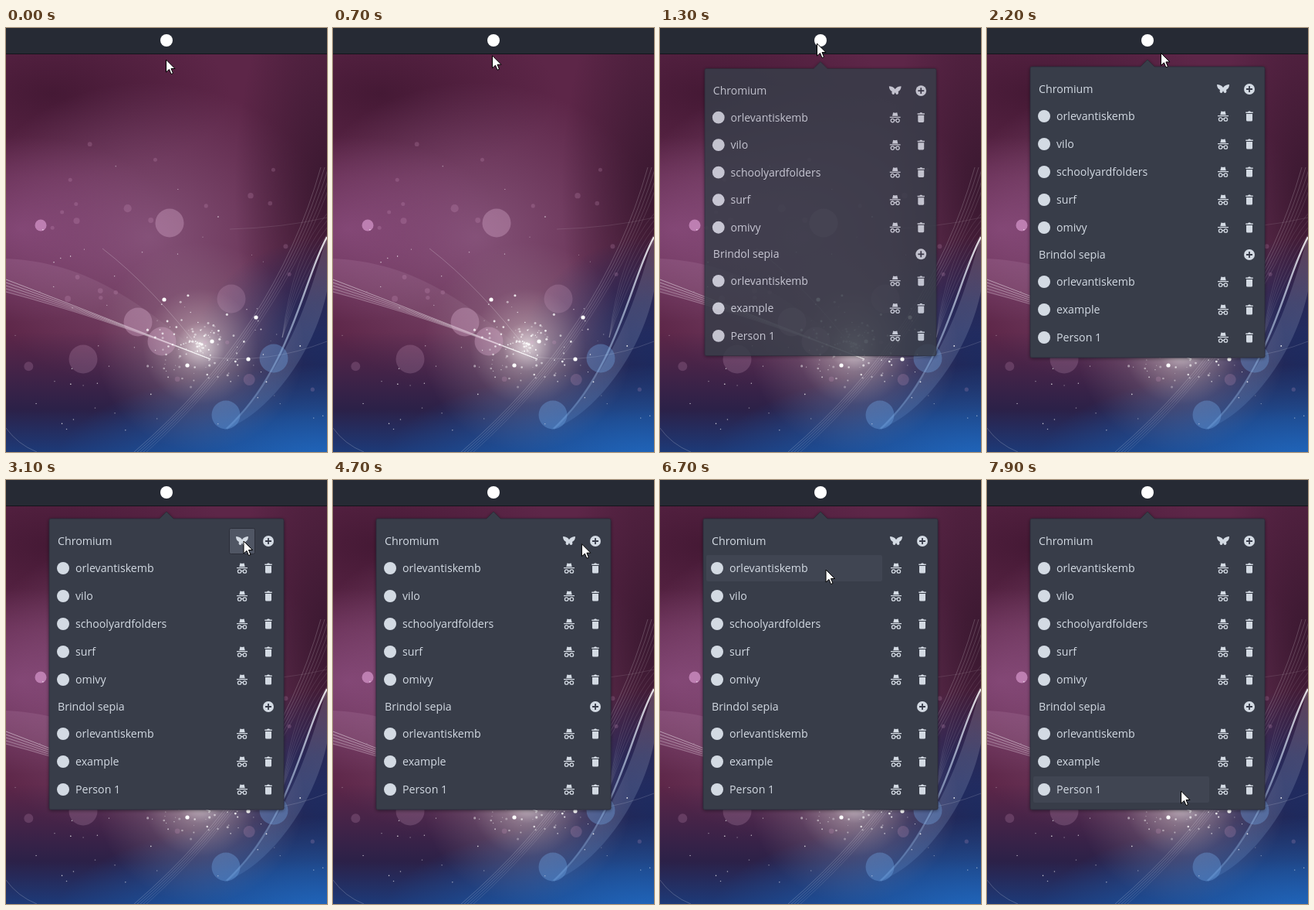
An HTML page that plays this animation: 416x548 px, repeating every 8000 ms.

```html
<!DOCTYPE html>
<html lang="en">
<head>
<meta charset="utf-8">
<title>Profile menu</title>
<style>
html, body { margin: 0; width: 100%; height: 100%; overflow: hidden; }
body {
  background:
    radial-gradient(circle at 252px 412px, rgba(255,250,248,.8), rgba(215,205,208,.46) 32px, rgba(170,150,165,.22) 75px, transparent 135px),
    radial-gradient(ellipse 350px 125px at 416px 560px, #2068bf, rgba(30,88,165,.8) 45%, transparent),
    linear-gradient(to top, #1d3a78, rgba(35,32,72,.85) 55px, transparent 155px),
    radial-gradient(ellipse 180px 170px at 416px 440px, rgba(22,48,108,.95), rgba(24,44,98,.7) 50%, transparent),
    radial-gradient(ellipse 120px 300px at 416px 210px, #3a1830, transparent),
    radial-gradient(ellipse 200px 120px at 20px 260px, rgba(140,78,128,.75), transparent),
    radial-gradient(ellipse 240px 200px at 185px 270px, rgba(134,84,122,.95), transparent),
    radial-gradient(ellipse 230px 110px at 60px 85px, #451935, transparent),
    #5d2648;
}
svg { display: block; width: 416px; height: 548px; font: 14.2px "Open Sans", "Noto Sans", sans-serif; }
text { fill: #d3dae3; white-space: pre; }
.icon { fill: #d3dae3; }
.thin { fill: none; stroke: #d3dae3; stroke-width: 1.3; }
.light { fill: none; stroke: #fff; }
</style>
</head>
<body>
<svg viewBox="0 0 416 548">
  <defs>
    <linearGradient id="veil" x2="1" y2=".4">
      <stop stop-color="#d9a9cf" stop-opacity=".14"/><stop offset="1" stop-color="#fff" stop-opacity=".04"/>
    </linearGradient>
    <linearGradient id="wing" x1="1" x2="0" y2="1">
      <stop stop-color="#fff" stop-opacity=".16"/><stop offset="1" stop-color="#6aa5e8" stop-opacity=".16"/>
    </linearGradient>
    <linearGradient id="edge" x2="0" y2="1">
      <stop stop-color="#fff" stop-opacity=".85"/><stop offset="1" stop-color="#8fbcf0" stop-opacity=".2"/>
    </linearGradient>
    <filter id="shade" x="-10%" y="-10%" width="120%" height="120%">
      <feDropShadow dx="0" dy="1" stdDeviation="2" flood-opacity=".45"/>
    </filter>
  </defs>
  <g id="wallpaper"></g>
  <rect width="416" height="33" fill="#262a34"/>
  <rect y="33" width="416" height="1" fill="#14151b"/>
  <circle cx="208" cy="16" r="8" fill="#fff"/>
  <g id="menu"></g>
  <g id="tips"></g>
  <path id="cursor" d="M0 0V16L4 12.5L6.5 18.5L9 17.5L6.5 11.5H11.5Z" fill="#fff" stroke="#000"/>
</svg>
<script>
const $ = id => document.getElementById(id);
const set = (id, attrs) => { for (const k in attrs) $(id).setAttribute(k, attrs[k]); };

let seed = 11;
const rnd = () => (seed = seed * 16807 % 2147483647) / 2147483647;
const dot = (x, y, r, fill, a) => `<circle cx="${x}" cy="${y}" r="${r}" fill="${fill}" fill-opacity="${a}"/>`;
const line = (d, a, w = 1) => `<path class="light" d="${d}" stroke-opacity="${a}" stroke-width="${w}"/>`;

function wallpaper() {
  let out = '<path d="M0 298C80 302 150 330 255 424C150 385 70 360 0 342Z" fill="url(#veil)"/>'
    + '<path d="M416 268C398 330 370 440 283 519C340 500 400 420 416 340Z" fill="url(#wing)"/>'
    + '<path d="M416 270C385 325 370 440 286 518" fill="none" stroke="url(#edge)" stroke-width="2.4"/>';
  for (let i = 0; i < 5; i++) {
    out += line(`M0 ${325 + i * 4}Q120 ${371 + i / 2} 265 428`, .45 - i * .05);
    out += line(`M${408 + i * 5} 180Q${348 + i * 2} 392 ${166 + i * 4} 548`, .2 - i * .02);
    out += line(`M416 ${240 + i * 9}Q${372 + i * 3} ${290 + i * 8} 358 400`, .1);
  }
  out += line('M125 285Q190 335 255 420', .22) + line('M416 245Q360 258 290 260', .1)
    + line('M416 405Q340 435 262 425', .15) + line('M0 517Q15 538 40 548', .2);

  for (const [x, y] of [[212, 252], [171, 380], [202, 405], [292, 350], [100, 428]])
    out += dot(x, y, 18.5, '#dcb0d0', y > 425 || x > 280 ? .2 : .34);
  for (const [x, y] of [[347, 427], [285, 500]]) out += dot(x, y, 18.5, '#78b0f0', .33);
  out += dot(45, 255, 7.5, '#e6a5dc', .6);
  for (const [x, y] of [[205, 351], [324, 374], [314, 428], [235, 436], [267, 405]])
    out += dot(x, y, 2.6, '#fff', 1);

  for (let i = 0; i < 120; i++) {
    const a = rnd() * 6.283, d = (rnd() + rnd()) * rnd() * 60;
    out += dot(252 + d * Math.cos(a) * 1.2, 409 + d * Math.sin(a), .5 + rnd() * 1.1, '#fff', .3 + rnd() * .6);
  }
  for (let i = 0; i < 55; i++)
    out += dot(rnd() * 416, 130 + 400 * Math.sqrt(rnd()), .5 + rnd() * .4, '#fff', .3 + rnd() * .6);
  for (let i = 0; i < 26; i++)
    out += dot(rnd() * 400, 150 + rnd() * 340, 2.5 + 5 * rnd() ** 3, '#dda6cc', .2);
  return out;
}

const at = (x, y, body) => `<g transform="translate(${x} ${y})">${body}</g>`;
const butterfly = '<path class="icon" d="M0-2C-2-5-5-6-8-6C-8-2-6 0-4 1C-5 3-4 5-2.5 5C-1 5-.5 3 0 2C.5 3 1 5 2.5 5C4 5 5 3 4 1C6 0 8-2 8-6C5-6 2-5 0-2Z"/>';
const plus = '<circle class="icon" r="7"/><path d="M-4 0H4M0-4V4" stroke="#383c4a" stroke-width="1.8"/>';
const disguise = '<path class="icon" d="M-3.7-1.8L-2.6-6.4L0-5.9L2.6-6.4L3.7-1.8Z"/>'
  + '<path class="thin" d="M-7-.3H7M-1.2 3.7Q0 3 1.2 3.7"/><circle class="thin" cx="-3.4" cy="4" r="2.2"/><circle class="thin" cx="3.4" cy="4" r="2.2"/>';
const bin = '<path class="icon" d="M-4.7-5.5H-2L-1-6.5H1L2-5.5H4.7V-4H-4.7ZM-4-3H4V5Q4 6.5 2.5 6.5H-2.5Q-4 6.5-4 5Z"/>';

const names = ['orlevantiskemb', 'vilo', 'schoolyardfolders', 'surf', 'omivy', 'orlevantiskemb', 'example', 'Person 1'];
const rowY = i => 114 + 36 * i + (i > 4 ? 34 : 0);

function menu() {
  const label = (x, y, s) => `<text x="${x}" y="${y + 5}">${s}</text>`;
  return '<path filter="url(#shade)" d="M58 50H199L208 41L217 50H358Q360 50 360 52V424Q360 426 358 426H58Q56 426 56 424V52Q56 50 58 50Z" fill="#383c4a" stroke="#2a2d38" stroke-width=".8"/>'
    + '<rect id="rowHover" x="60" width="228" height="34" rx="2" fill="#404552"/>'
    + '<rect id="btnHover" y="62.5" width="33" height="33" rx="2" stroke="#2b2e39"/>'
    + label(67, 79, 'Chromium') + label(67, 293, 'Brindol sepia')
    + at(306, 79, butterfly) + at(340, 79, plus) + at(340, 293, plus)
    + names.map((name, i) => dot(74, rowY(i), 8, '#d3dae3', 1) + label(90, rowY(i), name)
      + at(306, rowY(i), disguise) + at(340, rowY(i), bin)).join('');
}

function tip(id, cx, w, lines) {
  const x = cx - w / 2;
  return `<g id="${id}"><rect filter="url(#shade)" x="${x}" y="100" width="${w}" height="${20 + 17 * lines.length}" rx="2" fill="#4b5566"/>`
    + lines.map((s, i) => `<text x="${x + 10}" y="${124 + i * 17}">${s}</text>`).join('') + '</g>';
}

$('wallpaper').innerHTML = wallpaper();
$('menu').innerHTML = menu();
$('tips').innerHTML = tip('guestTip', 306.5, 142, ['Launch temporary', 'person. Its data', 'will be removed', 'when closed'])
  + tip('addTip', 340, 128, ['Add new person']);

// Eased progress from 0 to 1 between times a and b; a higher power starts faster.
const ease = (t, a, b, power = 1) => 1 - (1 - Math.min(1, Math.max(0, (t - a) / (b - a)))) ** power;

const moves = [
  { from: 600, to: 1000, x: 203.5, y: 20, power: 1 },
  { from: 2100, to: 3000, x: 308, y: 79, power: 2 },
  { from: 4600, to: 5100, x: 327.5, y: 84, power: 6 },
  { from: 6100, to: 6700, x: 215, y: 116, power: 1 },
  { from: 7400, to: 7900, x: 251.5, y: 402, power: 1 },
];

function draw(now) {
  const t = Math.floor(now % 8000 / 100) * 100;
  let x = 207.5, y = 41;
  for (const m of moves) {
    const p = ease(t, m.from, m.to, m.power);
    x += (m.x - x) * p;
    y += (m.y - y) * p;
  }
  set('cursor', { transform: `translate(${x} ${y})` });

  const open = ease(t, 1200, 1500, 5), scale = .9 + .1 * open;
  set('menu', { opacity: open, transform: `translate(208 238) scale(${scale}) translate(-208 -238)` });

  const row = names.findIndex((_, i) => x > 60 && x < 288 && Math.abs(y - rowY(i)) <= 17);
  set('rowHover', { opacity: row < 0 ? 0 : 1, y: rowY(row) - 17 });

  const onGuest = Math.abs(x - 306) < 16, onAdd = Math.abs(x - 340) < 16;
  const hover = Math.abs(y - 79) < 17 && (onGuest || onAdd);
  set('btnHover', { opacity: hover ? 1 : 0, x: onGuest ? 289.5 : 323.5, fill: onGuest ? '#505664' : '#474c5a' });

  set('guestTip', { opacity: ease(t, 3600, 3700) - ease(t, 4600, 4700) });
  set('addTip', { opacity: ease(t, 5900, 6010) - ease(t, 6100, 6300) });
}

const start = performance.now();
function tick() {
  draw(performance.now() - start);
  requestAnimationFrame(tick);
}
tick();
</script>
</body>
</html>
```
